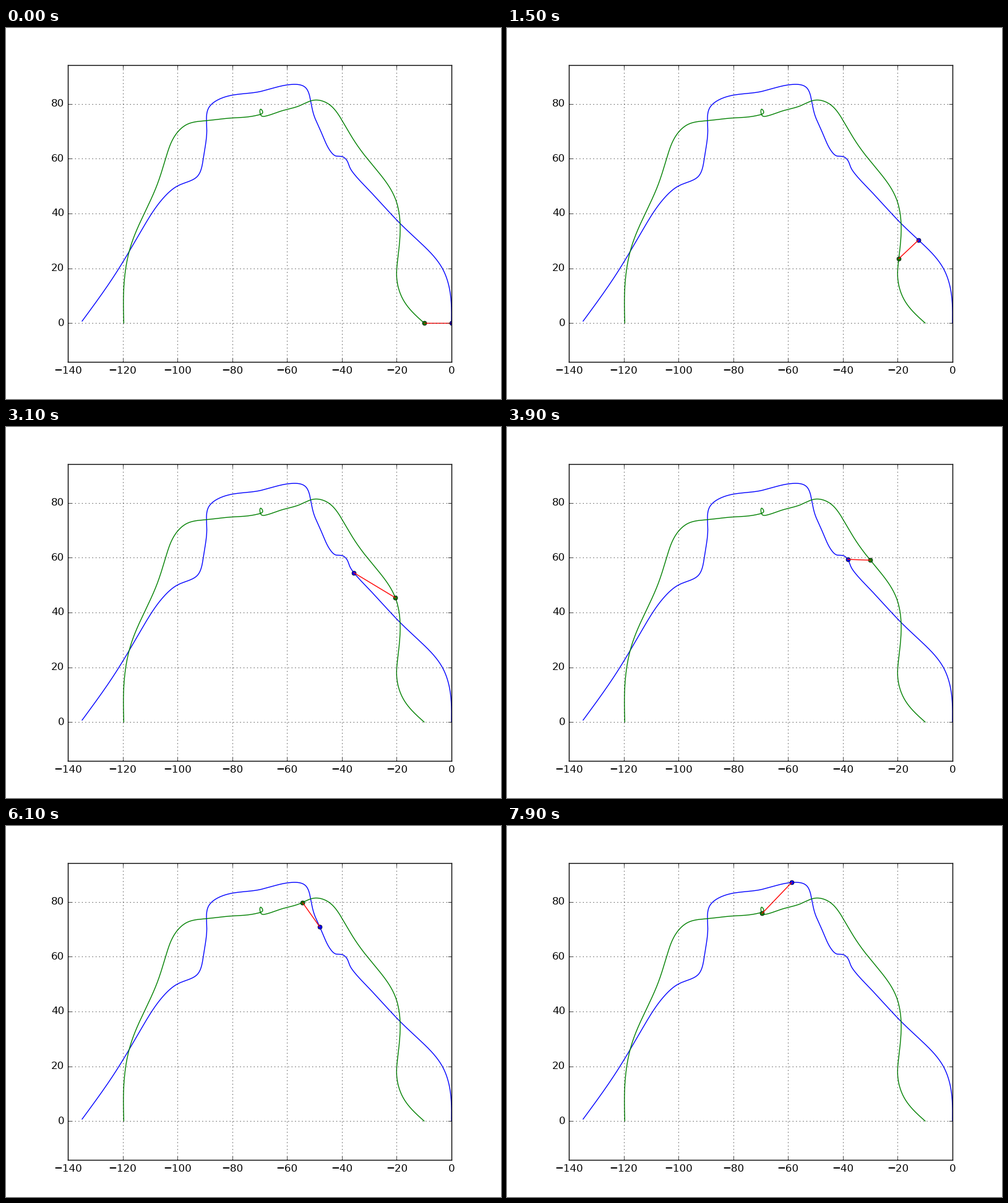
These frames come from a looping animation (800 px wide and 600 px high, 8 s). A matplotlib script:

```python
import numpy as np
import matplotlib.pyplot as plt
from matplotlib.animation import FuncAnimation

FRAMES, INTERVAL = 80, 100

# Path knots (x, y); a third value is the time in ms at which the dot is there.
BLUE = [(0, 0, 0), (-0.4, 10.5), (-3.2, 19.7), (-12.4, 30.3, 1500),
        (-18.9, 36.5), (-30, 48.4), (-35.6, 54.5, 3100), (-37.1, 56.8),
        (-38.2, 59.4, 3900), (-40, 60.8), (-42.2, 61), (-44, 62.5, 5300),
        (-47.2, 68.9), (-50.4, 76.5), (-51.5, 81.7, 6900), (-53.4, 86.1),
        (-58.7, 87.1, 7900), (-70.5, 84.4), (-84.2, 82), (-88.6, 78.6),
        (-89.3, 71), (-90.5, 60.6), (-92.8, 53.5), (-99.5, 50.3),
        (-104.1, 46.8), (-113.1, 33.9), (-122.8, 17.7), (-134.8, 0.7)]
GREEN = [(-10, 0, 0), (-17.4, 8.1), (-20, 16.7), (-19.6, 23.5, 1500),
         (-19, 39.2), (-20.5, 45.4, 3100), (-30, 59.1, 3900), (-36.1, 67.5),
         (-40.6, 75.1), (-45.2, 80.2, 5300), (-50.1, 81.4), (-55.3, 79.4),
         (-61.9, 77.5, 6900), (-67.7, 75.6), (-69.5, 75.8, 7900),
         (-69.6, 78.1), (-68.9, 77), (-70.4, 76), (-80, 74.9), (-89.6, 73.9),
         (-96.6, 72.5), (-101, 68.3), (-104.1, 60.8), (-107.5, 50.3),
         (-117, 28.3), (-119.7, 10), (-119.6, 0)]


def hermite(x, y, m, at):
    """Piecewise cubic through (x, y) with slopes m."""
    i = np.clip(np.searchsorted(x, at, side="right") - 1, 0, len(x) - 2)
    h = x[i + 1] - x[i]
    u = (at - x[i]) / h
    return (y[i] * (1 + 2 * u) * (1 - u) ** 2 + y[i + 1] * u * u * (3 - 2 * u)
            + h * u * (1 - u) * (m[i] * (1 - u) - m[i + 1] * u))


def smooth_path(knots, n=1500):
    """Natural cubic spline by chord length; path, arc length, arc at knots."""
    p = np.array([k[:2] for k in knots], float)
    h = np.hypot(*np.diff(p, axis=0).T)
    t = np.r_[0, np.cumsum(h)]
    d = np.diff(p, axis=0) / h[:, None]
    a = np.zeros((len(p), len(p)))
    b = np.zeros_like(p)
    a[0, :2] = a[-1, :-3:-1] = 2, 1
    b[0], b[-1] = 3 * d[0], 3 * d[-1]
    for i in range(1, len(p) - 1):
        a[i, i - 1:i + 2] = h[i], 2 * (h[i - 1] + h[i]), h[i - 1]
        b[i] = 3 * (h[i] * d[i - 1] + h[i - 1] * d[i])
    m = np.linalg.solve(a, b)
    at = np.linspace(0, t[-1], n)
    path = np.column_stack([hermite(t, p[:, k], m[:, k], at) for k in (0, 1)])
    arc = np.r_[0, np.cumsum(np.hypot(*np.diff(path, axis=0).T))]
    return path, arc, np.interp(t, at, arc)


def travel(knots, path, arc, knot_arc):
    """Position at every step, moving monotonically through the timed knots."""
    timed = [i for i, k in enumerate(knots) if len(k) == 3]
    t = np.array([knots[i][2] for i in timed], float)
    s = knot_arc[timed]
    v = np.diff(s) / np.diff(t)
    m = np.r_[v[0], 2 * v[:-1] * v[1:] / (v[:-1] + v[1:]), v[-1]]
    now = hermite(t, s, m, np.arange(FRAMES) * float(INTERVAL))
    return np.column_stack([np.interp(now, arc, path[:, k]) for k in (0, 1)])


plt.style.use("classic")
plt.rcParams.update({"font.family": "DejaVu Sans", "text.hinting": "native"})
fig = plt.figure(figsize=(8, 6), dpi=100, facecolor="white")
ax = fig.add_axes([0.125, 0.1, 0.775, 0.8])
half = 70 * 480 / 620               # equal scale on both axes
ax.set_xlim(-140, 0)
ax.set_ylim(40 - half, 40 + half)
ax.set_xticks(range(-140, 1, 20))
ax.set_yticks(range(0, 81, 20))
ax.grid(True)

tracks, dots = [], []
for color, knots in (("b", BLUE), ("g", GREEN)):
    path, arc, knot_arc = smooth_path(knots)
    ax.plot(*path.T, color=color)
    tracks.append(travel(knots, path, arc, knot_arc))
    dots += ax.plot([], [], color + "o", ms=5)
link, = ax.plot([], [], "r")


def update(i):
    ends = [track[i] for track in tracks]
    for dot, (x, y) in zip(dots, ends):
        dot.set_data([x], [y])
    link.set_data(*zip(*ends))
    return [*dots, link]


anim = FuncAnimation(fig, update, frames=FRAMES, interval=INTERVAL,
                     repeat=True, repeat_delay=0)
plt.show()
```
